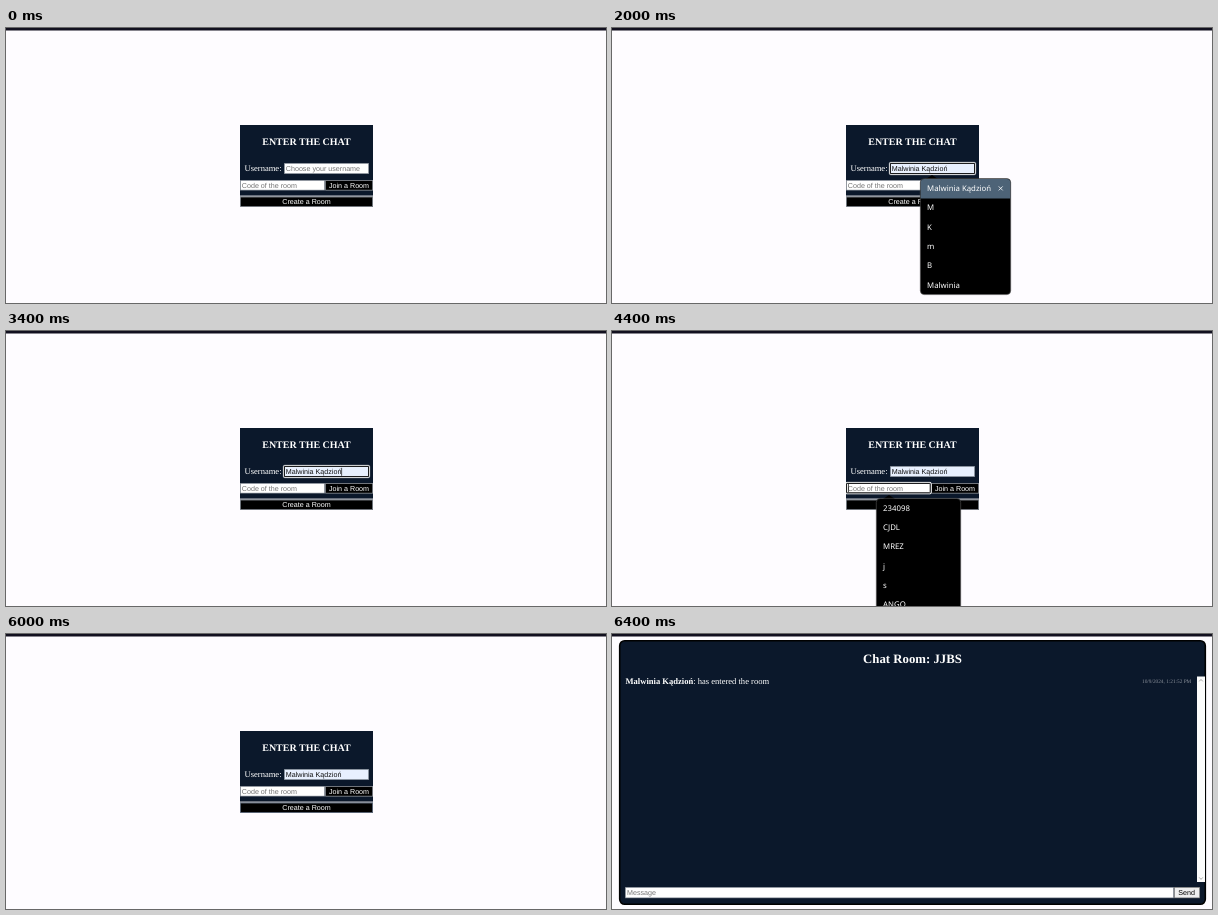
These frames come from a looping animation (600 by 275 pixels, 8000 ms). An HTML page:

```html
<!DOCTYPE html>
<html lang="en">
<head>
<meta charset="utf-8">
<title>Chat</title>
<style>
  html, body { margin: 0; width: 100%; height: 100%; overflow: hidden; background: #fefcff; }
  svg { display: block; width: 100%; height: 100%; }
  text { font: 7.15px "Liberation Sans", Arial, sans-serif; fill: #fff; text-rendering: geometricPrecision; white-space: pre; }
  .serif { font-family: "Liberation Serif", "Times New Roman", serif; font-size: 8.55px; }
  .bold { font-weight: bold; }
  .menu text { font: 7.8px "Noto Sans", sans-serif; }
  .mid { text-anchor: middle; }
  .end { text-anchor: end; }
  .hint { fill: #757575; }
  .dark { fill: #111; }
  .panel { fill: #0b182b; }
  .button { fill: #000; stroke: #8b8f96; stroke-width: .8; }
  .field { fill: #fff; stroke: #7b828d; stroke-width: .6; }
  .ring { fill: none; stroke: #fff; stroke-width: 1; }
  .ring + .ring { stroke: #101010; }
</style>
</head>
<body>
<svg viewBox="0 0 600 275" preserveAspectRatio="none">
  <rect width="600" height="275" fill="#fefcff"/>
  <rect width="600" height="2.5" fill="#12101f"/>

  <g id="login">
    <rect class="panel" x="234" y="97" width="133" height="82"/>
    <text class="serif bold mid" x="300.5" y="116.8" style="font-size:10px">ENTER THE CHAT</text>
    <text class="serif" x="238.5" y="143">Username:</text>

    <rect class="field" id="nameField" x="278.3" y="135.3" width="84.4" height="10.4"/>
    <text class="hint" id="nameHint" x="279.8" y="143">Choose your username</text>
    <text class="dark" id="nameValue" x="279.8" y="143"></text>
    <g id="nameFocus">
      <rect class="ring" x="277.4" y="134.4" width="86.2" height="12.2" rx="1.2"/>
      <rect class="ring" x="278.4" y="135.4" width="84.2" height="10.2" rx=".6"/>
    </g>
    <rect class="dark" id="nameCaret" y="136.8" width=".7" height="8"/>

    <rect class="field" x="234.3" y="152.3" width="84.4" height="9.8"/>
    <text class="hint" x="235.8" y="159.6">Code of the room</text>
    <rect class="button" x="319.6" y="152.4" width="47" height="9.8"/>
    <text class="mid" x="343" y="159.6">Join a Room</text>
    <g id="codeFocus">
      <rect class="ring" x="233.6" y="151.4" width="85.6" height="11.4" rx="1.2"/>
      <rect class="ring" x="234.6" y="152.4" width="83.6" height="9.4" rx=".6"/>
    </g>
    <rect class="dark" id="codeCaret" x="236" y="153" width=".7" height="8"/>

    <rect x="234" y="167.6" width="133" height="1" fill="#f2f3f6"/>
    <rect class="button" id="create" x="234.5" y="169" width="132" height="9.6"/>
    <text class="mid" x="300.5" y="176.3">Create a Room</text>

    <g class="menu" id="nameMenu"></g>
    <g class="menu" id="codeMenu"></g>
  </g>

  <g id="room">
    <rect class="panel" x="7.7" y="6.7" width="585.6" height="263.6" rx="5" stroke="#000" stroke-width="1.6"/>
    <text class="serif bold mid" x="300.5" y="28.8" style="font-size:12.8px">Chat Room: JJBS</text>
    <g id="message">
      <text class="serif" x="13.5" y="50.3"><tspan class="bold" id="author"></tspan>: has entered the room</text>
      <text class="serif end" x="579.3" y="49" style="font-size:5.3px;fill:#8b919b">10/9/2024, 1:21:52 PM</text>
    </g>
    <rect x="585" y="42.5" width="8" height="205.5" fill="#fcfcfc"/>
    <path d="M587.2 47.4l1.8-2 1.8 2M587.2 243.4l1.8 2 1.8-2" fill="none" stroke="#a0a0a0" stroke-width=".9"/>
    <rect class="field" x="13.3" y="253.3" width="548.4" height="10.6"/>
    <text class="hint" x="15" y="261.2">Message</text>
    <rect x="562.3" y="253.3" width="25.4" height="10.6" fill="#efefef" stroke="#777" stroke-width=".6"/>
    <text class="mid" x="574.7" y="261.2" style="fill:#000">Send</text>
  </g>
</svg>

<script>
const LOOP = 8000, ROW = 19.3;
const USER = "Malwinia Kądzioń";
const $ = id => document.getElementById(id);
const show = (id, on) => $(id).style.display = on ? "" : "none";
const within = (t, from, to) => t >= from && t < to;

function buildMenu(id, x, y, width, height, arrowX, items) {
  const rows = items.map((item, i) =>
    `<text x="${x + 6.8}" y="${y + 12.4 + i * ROW}">${item}</text>`).join("");
  $(id).innerHTML = `
    <path d="M${arrowX - 6} ${y + .5}l6 -4 6 4z"/>
    <rect x="${x}" y="${y}" width="${width}" height="${height}" rx="4" stroke="#555" stroke-width=".6"/>
    <g id="${id}Hover">
      <path d="M${x + .4} ${y + 20}v-16q0-3.6 3.6-3.6h${width - 8}q3.6 0 3.6 3.6v16z" fill="#4d6377"/>
      <path d="M${x + width - 12} ${y + 7.8}l4 4m0-4l-4 4" stroke="#fff" stroke-width=".8"/>
    </g>${rows}`;
}

buildMenu("nameMenu", 308.3, 150.6, 90.4, 116, 320,
  [USER, "M", "K", "m", "B", USER.split(" ")[0]]);
buildMenu("codeMenu", 264.3, 167.4, 84.4, 130, 277,
  ["234098", "CJDL", "MREZ", "j", "s", "ANGO"]);
show("codeMenuHover", false);
$("nameValue").textContent = $("author").textContent = USER;
const nameEnd = 279.8 + $("nameValue").getComputedTextLength();

// Menus close with a brief fade; carets blink every 600 ms.
function menu(id, t, open, close) {
  show(id, within(t, open, close + 200));
  $(id).style.opacity = t < close ? 1 : .92;
}
const blink = (t, from, to) => within(t, from, to) && Math.floor((t - from) / 600) % 2 === 0;

function draw(t) {
  const filled = t >= 1200, chosen = t >= 2200;
  show("login", t < 6200);
  show("room", t >= 6200);
  show("message", t >= 6400);

  show("nameHint", !filled);
  show("nameValue", filled);
  $("nameField").style.fill = filled ? "#e8f0fe" : "#fff";
  show("nameFocus", within(t, 200, 4400));
  show("nameCaret", blink(t, 200, 2200) || blink(t, 2200, 4400));
  $("nameCaret").setAttribute("x", chosen ? nameEnd : 279.8);
  menu("nameMenu", t, 200, 2200);
  show("nameMenuHover", filled);

  show("codeFocus", within(t, 4400, 5400));
  show("codeCaret", blink(t, 4400, 5400));
  menu("codeMenu", t, 4400, 5400);

  $("create").style.stroke = t >= 6000 ? "#6f7a8c" : "";
}

function frame(now) {
  draw(now % LOOP);
  requestAnimationFrame(frame);
}
draw(0);
requestAnimationFrame(frame);
</script>
</body>
</html>
```
